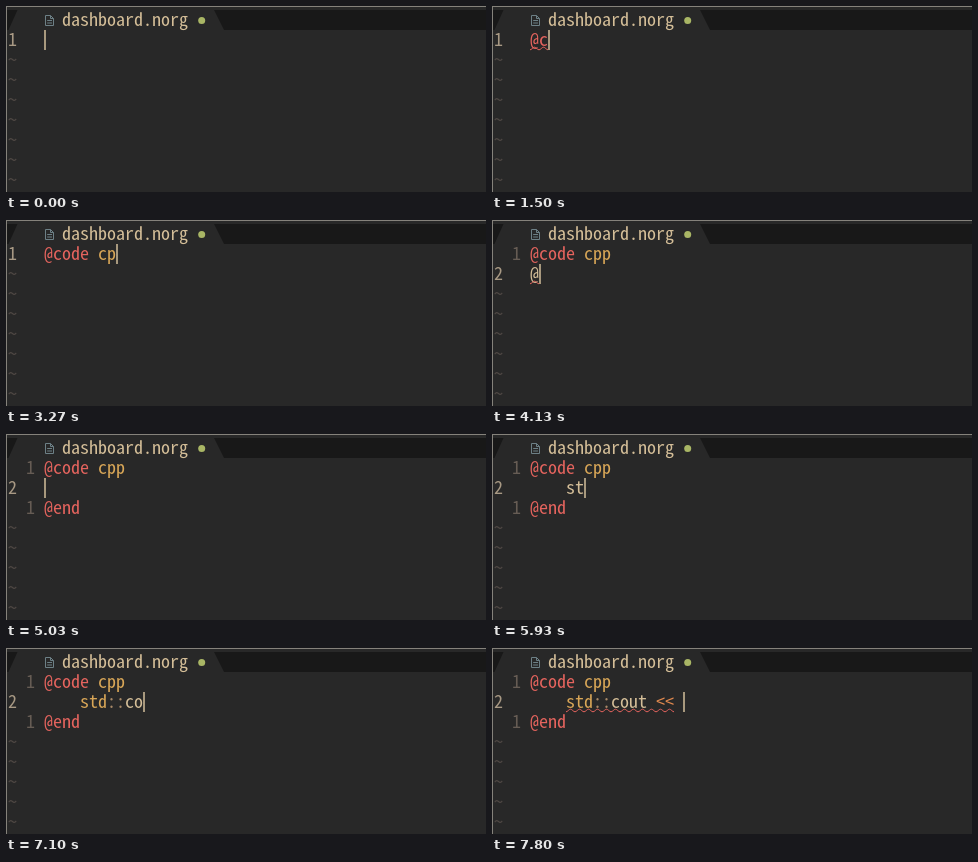
An HTML page for the animation above (8000 ms loop, 480x186 px).

```html
<!DOCTYPE html>
<html lang="en">
<head>
<meta charset="utf-8">
<title>Editor typing</title>
<style>
  html, body { margin: 0; width: 100%; height: 100%; overflow: hidden; background: #282828; }
  svg { display: block; width: 480px; height: 186px; }
  text { white-space: pre; }
</style>
</head>
<body>
<svg id="stage" viewBox="0 0 480 186">
  <rect width="480" height="186" fill="#282828"/>
  <path d="M1 4H11.5L2.5 24H1ZM208 4H480V24H218Z" fill="#181818"/>
  <path d="M0 .5H480M.5 0V186" stroke="#85827b" fill="none"/>
  <g fill="none" stroke="#6d8086">
    <path d="M39.5 9.5H44.5L47.5 12.5V19.5H39.5ZM44.5 9.5V12.5H47.5"/>
    <path d="M41.2 14.5H46M41.2 17H46"/>
  </g>
  <text x="56" y="19.5" fill="#d4be98">dashboard.norg</text>
  <circle cx="195.7" cy="14.5" r="3.5" fill="#a9b665"/>
  <g id="page"></g>
  <rect id="caret" width="1.6" height="20" fill="#c9b694"/>
</svg>
<script>
const LOOP = 8000, COL = 9, ROW = 20, LEFT = 2, TOP = 24, TEXT_COL = 4;
const FONT = '"Noto Sans Mono CJK JP", "Noto Sans Mono CJK SC", "Noto Sans Mono", monospace';
const FG = '#d4be98', RED = '#e5645e', GOLD = '#d8a657', ORANGE = '#e0884e',
      PUNCT = '#a98a68', CURRENT = '#a89984', DIM = '#665c54', TILDE = '#504945';
const stage = document.getElementById('stage');
const page = document.getElementById('page');
const caret = document.getElementById('caret');

// Choose the font size whose character advance equals one grid column
const pen = document.createElement('canvas').getContext('2d');
pen.font = `100px ${FONT}`;
stage.style.fontFamily = FONT;
stage.style.fontSize = `${COL * 100 / pen.measureText('0').width}px`;

// Moment at which each character of a line appears
const TAG = [800, 1500, 1630, 1830, 2030, 2400, 3070, 3230, 3370];
const END = [4130, 4530, 4630, 4730];
const BODY = [5870, 5930, 6030, 6470, 6600, 6900, 7000, 7130, 7230, 7370, 7500, 7600, 7700];
const ENTER = 3630, OPEN = 5030, INDENT = 5400;

const count = (times, t) => times.filter(k => k <= t).length;
const gridX = col => LEFT + col * COL;

function label(row, col, str, fill) {
  return `<text x="${gridX(col)}" y="${TOP + row * ROW + 15.5}" fill="${fill}">${str.replace(/</g, '&lt;')}</text>`;
}

// One wave per character cell
function curl(row, col, len) {
  const y = TOP + row * ROW + 18.5;
  const wave = 'c1.6 0 2.9 -2.6 4.5 -2.6s2.9 2.6 4.5 2.6';
  return `<path d="M${gridX(col)} ${y + 1.3}${wave.repeat(len)}" fill="none" stroke="${RED}"/>`;
}

// Colours consecutive slices of the visible characters
function line(row, indent, n, parts) {
  let out = '', at = 0;
  for (const [str, fill] of parts) {
    const seen = str.slice(0, Math.max(0, n - at));
    if (seen.trim()) out += label(row, TEXT_COL + indent + at, seen, fill);
    at += str.length;
  }
  return out;
}

function view(t) {
  const tag = count(TAG, t), end = count(END, t), body = count(BODY, t);
  const entered = t >= ENTER, opened = t >= OPEN;
  const row = entered ? 1 : 0;
  const last = opened ? 2 : row;
  let out = '';

  out += label(0, entered ? 2 : 0, '1', entered ? DIM : CURRENT);
  if (entered) out += label(1, 0, '2', CURRENT);
  if (opened) out += label(2, 2, '1', DIM);
  for (let r = last + 1; r < 8; r++) out += label(r, 0, '~', TILDE);

  out += line(0, 0, tag, [['@code ', tag > 1 ? RED : FG], ['cpp', GOLD]]);
  if (tag && tag < 7) out += curl(0, TEXT_COL, tag);

  out += line(last, 0, end, [['@end', end > 1 ? RED : FG]]);
  if (end && end < 4) out += curl(last, TEXT_COL, end);

  out += line(1, 4, body, [['std', body > 3 ? GOLD : FG], ['::', PUNCT], ['cout ', FG], ['<< ', ORANGE]]);
  if (body > 10) out += curl(1, TEXT_COL + 4, Math.min(body, 12));

  const col = opened ? (t >= INDENT ? 4 + body : 0) : entered ? end : tag;
  return { out, x: gridX(TEXT_COL + col), y: TOP + row * ROW };
}

let shown = '';
function frame(now) {
  const { out, x, y } = view(now % LOOP);
  if (out !== shown) page.innerHTML = shown = out;
  caret.setAttribute('x', x + .2);
  caret.setAttribute('y', y);
  requestAnimationFrame(frame);
}
frame(0);
</script>
</body>
</html>
```
